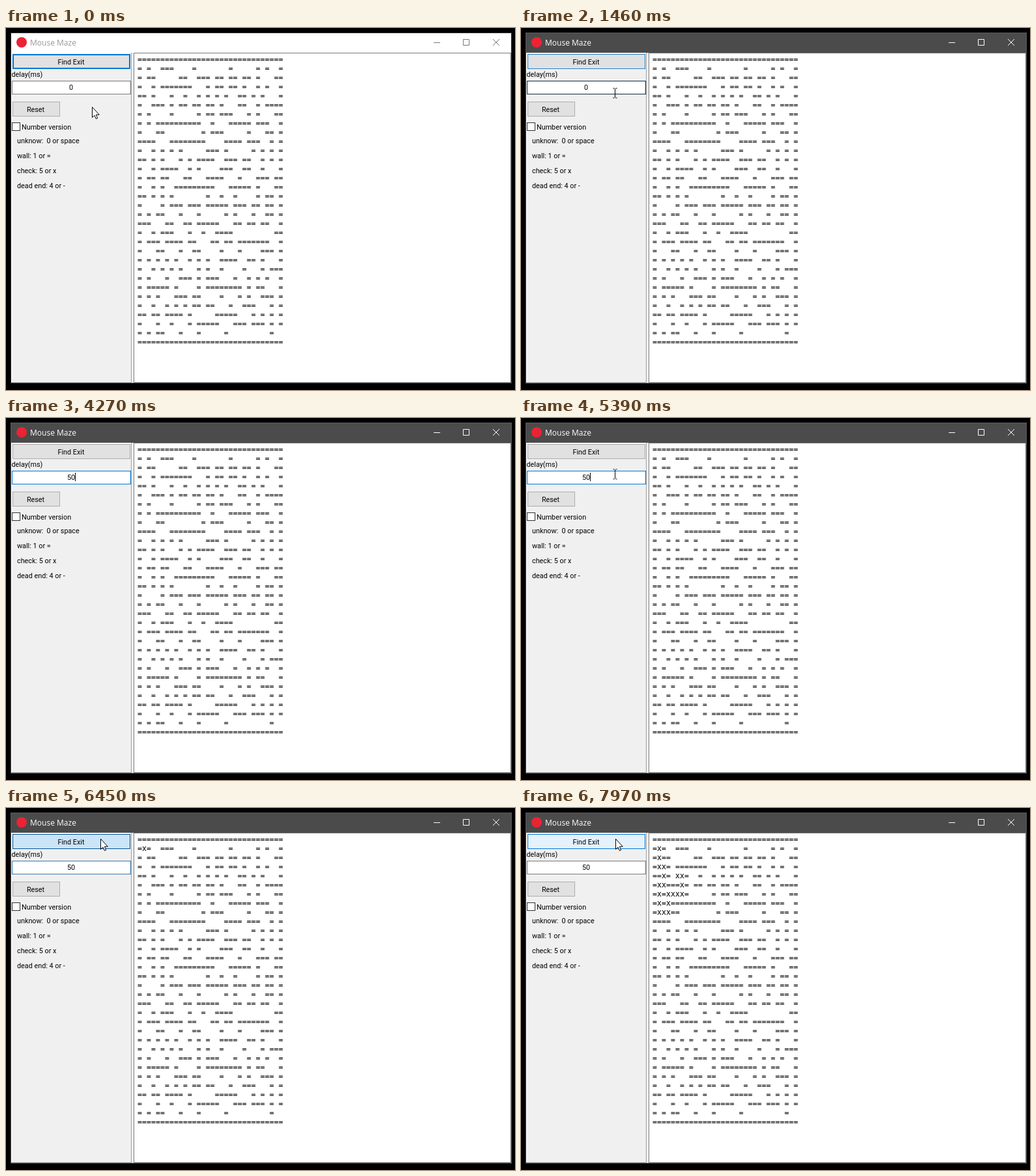
These frames come from a looping animation (782x556 px, 8 s). An HTML page:

```html
<!DOCTYPE html>
<html lang="en">
<head>
<meta charset="utf-8">
<title>Mouse Maze</title>
<style>
html, body { margin: 0; width: 100%; height: 100%; overflow: hidden; background: #000; }
svg { display: block; width: 782px; height: 556px; }
text { white-space: pre; }
.ui { font: 10.8px Roboto, "Noto Sans", sans-serif; fill: #000; }
.mid { text-anchor: middle; }
.maze { font: 11.628px "DejaVu Sans Mono", monospace; fill: #000; }
</style>
</head>
<body>
<svg id="stage" viewBox="0 0 782 556" xmlns="http://www.w3.org/2000/svg"></svg>
<script>
const LOOP = 8000;
const stage = document.getElementById('stage');

function add(tag, attrs, content) {
  const node = document.createElementNS('http://www.w3.org/2000/svg', tag);
  set(node, attrs);
  if (content !== undefined) node.textContent = content;
  stage.appendChild(node);
  return node;
}
function set(node, attrs) {
  for (const k in attrs) node.setAttribute(k, attrs[k]);
}
const rect = (x, y, width, height, fill) => add('rect', { x, y, width, height, fill });
// 1px outlined box covering whole pixels
const box = (x, y, w, h, fill, stroke) =>
  add('rect', { x: x + .5, y: y + .5, width: w - 1, height: h - 1, fill, stroke });
const label = (x, y, str, cls = 'ui') => add('text', { x, y, class: cls }, str);
const show = (node, on) => node.setAttribute('visibility', on ? 'visible' : 'hidden');

const clamp = v => Math.max(0, Math.min(1, v));
const part = (t, a, b) => clamp((t - a) / (b - a));
const ease = p => p * p * (3 - 2 * p);
const mix = (a, b, p) => a + (b - a) * p;
const blend = (a, b, p) => `rgb(${a.map((v, i) => Math.round(mix(v, b[i], p)))})`;

const GRAY = [225, 225, 225], EDGE = [173, 173, 173];
const HOT = [229, 241, 251], BLUE = [0, 120, 215];
const DOWN = [204, 228, 247], NAVY = [0, 84, 153];
const FIELD = [122, 122, 122], DARK = [23, 23, 23];

// window
const frame = rect(7, 7, 770, 539, '#333');
const bar = rect(8, 8, 768, 30, '#fff');
rect(8, 38, 768, 507, '#f0f0f0');
add('circle', { cx: 24, cy: 22, r: 8, fill: '#ea2434' });
const title = add('text', {
  x: 37, y: 27, 'font-size': 12, 'font-family': '"Open Sans", "Noto Sans", sans-serif'
}, 'Mouse Maze');
const icons = add('path', {
  d: 'M657 22.5h10M702.5 17.5h9v9h-9zM748 17l10 10M758 17l-10 10', fill: 'none'
});

// panels, the left one with a raised bevel
rect(8, 38, 185, 1, '#fff');
rect(8, 38, 1, 507, '#fff');
rect(192, 38, 1, 507, '#a0a0a0');
rect(8, 544, 185, 1, '#a0a0a0');
rect(193, 38, 3, 507, '#f7f7f7');
box(196, 38, 580, 507, '#fff', '#7a7a7a');

const find = add('rect', {});
label(100, 56, 'Find Exit', 'ui mid');
label(8.5, 75, 'delay(ms)');
const edit = box(9, 81, 183, 21, '#fff', '#7a7a7a');
const value = label(100, 95, '0', 'ui mid');
const caret = rect(103, 84, 1, 13, '#000');
box(10, 113, 73, 23, '#e1e1e1', '#adadad');
label(45.5, 129, 'Reset', 'ui mid');
box(9, 145, 13, 13, '#fff', '#333');
label(24, 156, 'Number version');
['unknow:  0 or space', 'wall: 1 or =', 'check: 5 or x', 'dead end: 4 or -']
  .forEach((s, i) => label(17, 177 + 23 * i, s));

// maze
const WALL = '='.repeat(32);
const maze = [
  WALL,
  '= =  ===    =       =     = =  =',
  '= ==     ==  === == == == =   ==',
  '=  = =======   = == == =  = =  =',
  '== =   =  =  = = = =  == = =   =',
  '=  === = == == == =   ==  = ====',
  '= =    =     = == ===   = =   ==',
  '= = ==========  =   ===== ===  =',
  '=   ==        = ===     =   == =',
  '====   ========    ==== ===  = =',
  '=  = = = =     === =     = = = =',
  '== = =   = = ====  === ==  = = =',
  '=  = ====  = =    ===  ==  =   =',
  '= == ==   ==   ====   =   === ==',
  '=  = =  =========   ===== =   ==',
  '== = = =       =  =  =    = == =',
  '=    = === === ===== === == == =',
  '= = ==   =   =     = =   =  == =',
  '===   ==  == =====   == == ==  =',
  '=  = ===   =  =  ====         ==',
  '= === ==== ==   == == =======  =',
  '=   ==   =  ==    =   =    === =',
  '= = = = =  = = =  ====  == =   =',
  '=  = = = =   = =  =    =   = ===',
  '= =   =  === = ===   =  = = =  =',
  '= ===== =    = ======== = ==   =',
  '= = =   === ==    =   = =  === =',
  '=  =  = = = == ==   =  ===   = =',
  '== == ==== =     =====   = = = =',
  '=   =  =   = =====   === === = =',
  '= = ==   =   =     =         =  ',
  WALL
];
const rows = maze.map((s, i) => label(202, 52 + 14 * i, s, 'maze'));

const MOVES = { U: [-1, 0], D: [1, 0], L: [0, -1], R: [0, 1] };
const trail = [[1, 1]];
for (const m of 'DDRDDLDDDRRUURRRUUL') {
  const [r, c] = trail[trail.length - 1];
  trail.push([r + MOVES[m][0], c + MOVES[m][1]]);
}

let drawn = 0;
function drawTrail(n) {
  if (n === drawn) return;
  drawn = n;
  const grid = maze.map(s => [...s]);
  trail.slice(0, n).forEach(([r, c]) => { grid[r][c] = 'x'; });
  for (let i = 1; i < 9; i++) rows[i].textContent = grid[i].join('');
}

// pointers
const arrow = add('path', {
  d: 'M.5 .5V16.5L4 13.2 6.4 18.5 8.7 17.5 6.4 12.2H11.3Z',
  fill: '#fff', stroke: '#000', 'stroke-linejoin': 'round'
});
const beam = add('path', {
  d: 'M-3 -7.5H-1M1 -7.5H3M0 -7V7M-3 7.5H-1M1 7.5H3', fill: 'none', stroke: '#000'
});

function drawPointer(t) {
  let x, y, text = false;
  if (t < 1160) {
    const p = ease(part(t, 750, 1010));
    x = mix(132, 142, p);
    y = mix(121, 102, p);
  } else if (t < 5330) {
    x = 144.5;
    y = 100;
    text = true;
  } else {
    const p = ease(part(t, 5330, 5720));
    x = mix(144, 145, p);
    y = mix(89, 47, p);
    text = y > 81;
    if (text) x += .5;
  }
  const hidden = t >= 3960 && t < 5330;
  show(beam, text && !hidden);
  show(arrow, !text && !hidden);
  (text ? beam : arrow).setAttribute('transform', `translate(${x.toFixed(2)} ${y.toFixed(2)})`);
}

function drawButton(t) {
  let fill = GRAY, edge = EDGE, w = 1, p = 1;
  let fill0 = GRAY, edge0 = EDGE;
  if (t < 1430) {
    edge = BLUE;
    w = 2;
  } else if (t < 5680) {
    edge0 = BLUE;
    p = part(t, 1430, 1580);
  } else if (t < 6360) {
    fill = HOT;
    edge = BLUE;
    p = part(t, 5680, 5930);
  } else {
    fill0 = DOWN;
    edge0 = NAVY;
    fill = HOT;
    edge = BLUE;
    p = part(t, 6450, 6620);
  }
  set(find, {
    x: 10 + w / 2, y: 40 + w / 2, width: 181 - w, height: 23 - w,
    fill: blend(fill0, fill, p), stroke: blend(edge0, edge, p), 'stroke-width': w
  });
}

function drawEdit(t) {
  const str = t < 3560 ? '0' : t < 3960 ? '' : t < 4270 ? '5' : '50';
  value.textContent = str;
  caret.setAttribute('x', 100 + 3 * str.length);
  const since = t < 3560 ? 1580 : t < 3960 ? 3560 : t < 4270 ? 3960 : 4270;
  const focus = t >= 1580 && t < 6360;
  show(caret, focus && Math.floor((t - since) / 524) % 2 === 0);
  edit.setAttribute('stroke',
    t < 1430 ? blend(FIELD, DARK, part(t, 1160, 1320)) :
    t < 6360 ? blend(DARK, BLUE, part(t, 1430, 1580)) :
    blend(BLUE, FIELD, part(t, 6360, 6560)));
}

function draw(t) {
  const active = t >= 1430;
  frame.setAttribute('fill', active ? '#5a5a5a' : '#333');
  bar.setAttribute('fill', active ? '#4b4b4b' : '#fff');
  title.setAttribute('fill', active ? '#fff' : '#999');
  icons.setAttribute('stroke', active ? '#fff' : '#777');
  drawButton(t);
  drawEdit(t);
  drawPointer(t);
  drawTrail(t < 6450 ? 0 : Math.min(trail.length, Math.floor((t - 6450) / 80) + 1));
}

let start;
function tick(now) {
  if (start === undefined) start = now;
  draw(Math.max(0, now - start) % LOOP);
  requestAnimationFrame(tick);
}
draw(0);
requestAnimationFrame(tick);
</script>
</body>
</html>
```
